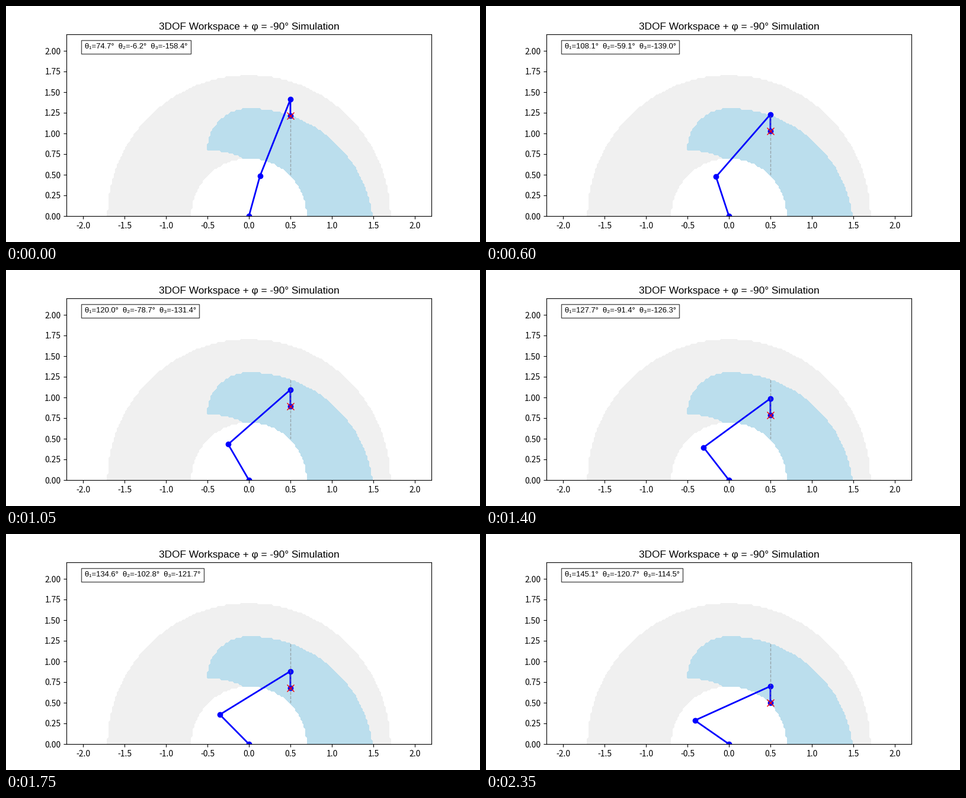
Recreate the animation shown at these times as a matplotlib script. Size 800x400 px, loop 2.4 s.

```python
import numpy as np
import matplotlib.pyplot as plt
from matplotlib.animation import FuncAnimation

plt.rcParams["font.family"] = ["Liberation Sans", "DejaVu Sans"]
plt.rcParams["axes.unicode_minus"] = False

L1, L2, L3 = 0.5, 1.0, 0.2
PHI = -np.pi / 2
FRAMES, INTERVAL = 48, 50


def solve(x, y):
    """Elbow-up joint angles for a tip at (x, y) pointing along PHI."""
    wx, wy = x - L3 * np.cos(PHI), y - L3 * np.sin(PHI)
    c2 = (wx**2 + wy**2 - L1**2 - L2**2) / (2 * L1 * L2)
    t2 = -np.arccos(np.clip(c2, -1, 1))
    t1 = np.arctan2(wy, wx) - np.arctan2(L2 * np.sin(t2), L1 + L2 * np.cos(t2))
    return t1, t2, PHI - t1 - t2, np.abs(c2) <= 1


def joints(angles):
    heading = np.cumsum(angles)
    lengths = np.array([L1, L2, L3])
    px = np.append(0, np.cumsum(lengths * np.cos(heading)))
    py = np.append(0, np.cumsum(lengths * np.sin(heading)))
    return px, py


# Reachable area, and the part reachable with the tip pointing down
gx, gy = np.meshgrid(np.linspace(-2, 2, 200), np.linspace(0, 2, 100))
radius = np.hypot(gx, gy)
reach = (radius >= L2 - L1 + L3) & (radius <= L1 + L2 + L3)
t1, t2, t3, valid = solve(gx, gy)
down = reach & valid & (t1 >= 0) & (t1 <= np.pi) & (t3 >= -np.pi)

fig, ax = plt.subplots(figsize=(8, 4), dpi=100)
ax.set_aspect("equal")
ax.set_xlim(-2.2, 2.2)
ax.set_ylim(0, 2.2)
ax.set_title("3DOF Workspace + φ = -90° Simulation", fontsize=12.4)
for label in ax.get_xticklabels() + ax.get_yticklabels():
    label.set_fontfamily("Noto Sans CJK JP")

levels = [0.5, 1.5]
ax.contourf(gx, gy, reach.astype(float), levels=levels, colors=["#f0f0f0"])
ax.contourf(gx, gy, down.astype(float), levels=levels, colors=["skyblue"], alpha=0.5)

path_x = 0.5
path_y = np.linspace(120 / 99, 0.5, FRAMES)

arm, = ax.plot([], [], "o-", color="blue", lw=2)
ax.plot([path_x] * 2, path_y[[0, -1]], "--", color="gray", lw=1, alpha=0.6)
goal, = ax.plot([], [], "rx", ms=8)
info = ax.text(0.05, 0.95, "", transform=ax.transAxes, va="top", fontsize=9.4,
               bbox=dict(facecolor="white", alpha=0.7))


def update(i):
    y = path_y[i]
    angles = np.array(solve(path_x, y)[:3])
    arm.set_data(*joints(angles))
    goal.set_data([path_x], [y])
    info.set_text("  ".join(f"θ{sub}={deg:.1f}°"
                            for sub, deg in zip("₁₂₃", np.degrees(angles))))
    return arm, goal, info


anim = FuncAnimation(fig, update, frames=FRAMES, interval=INTERVAL,
                     repeat=True, repeat_delay=0)
plt.show()
```
